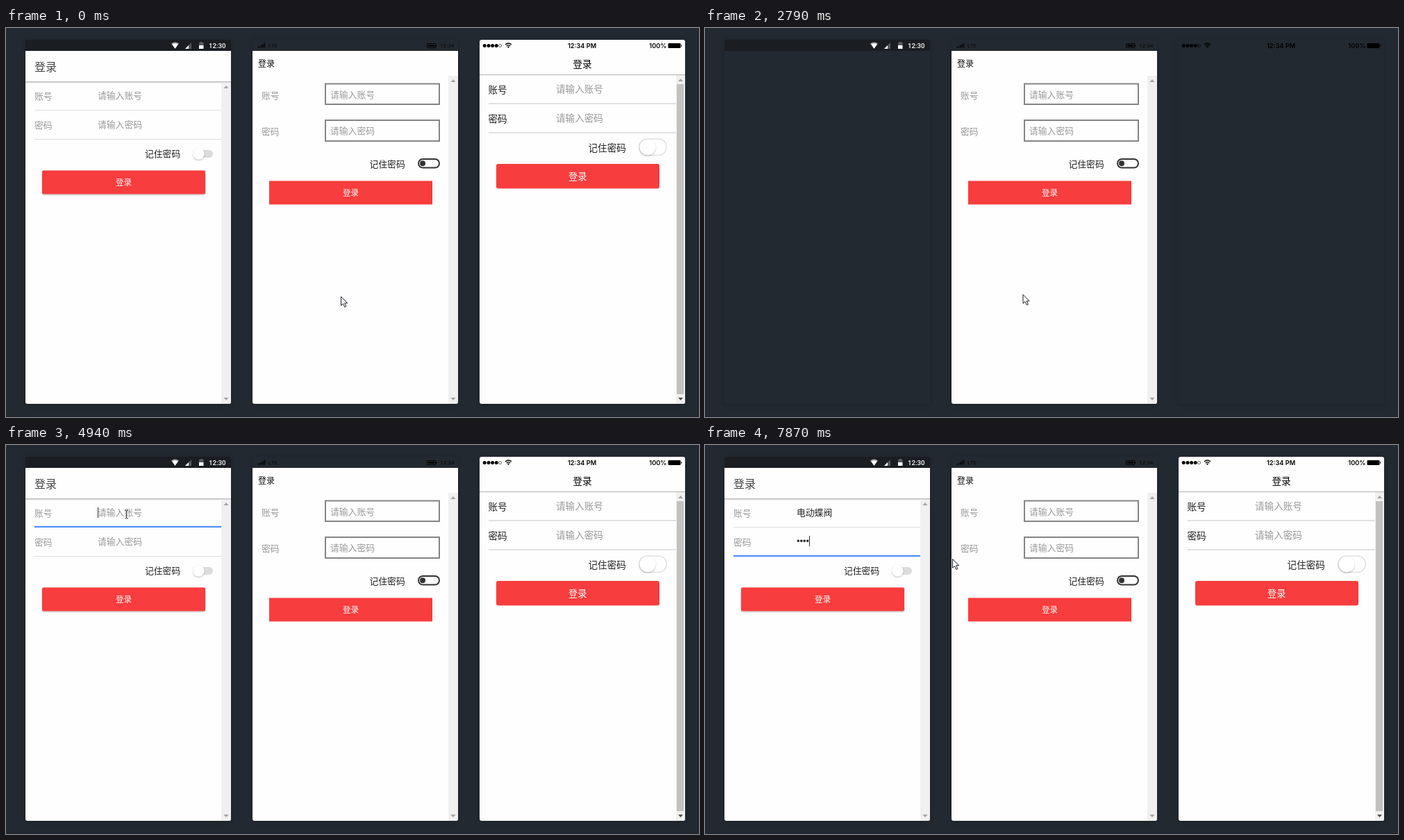
Animation of 998x561 px, one loop 8000 ms. Source, as an HTML page:

```html
<!DOCTYPE html>
<html lang="zh-CN">
<head>
<meta charset="utf-8">
<title>登录</title>
<style>
html, body { margin: 0; width: 100%; height: 100%; overflow: hidden; background: #232930; }
svg { position: absolute; left: 0; top: 0; }
.phone { position: absolute; top: 17px; width: 296px; height: 525px; border-radius: 3px; box-shadow: 0 1px 6px rgba(0,0,0,.16); }
text { font: 12.8px "Noto Sans CJK SC", "Noto Sans CJK JP", sans-serif; white-space: pre; }
.ios { font-size: 13.6px; }
.hint { fill: #999; }
.dark { fill: #222; }
.btn { fill: #fff; text-anchor: middle; font-size: 11.6px; font-weight: 500; }
.red { fill: #f73d3d; }
.page { fill: #fefefe; }
.focus { fill: #488aff; }
.caret { fill: #333; }
.bar { fill: #f0f0f1; }
.clock { font: 500 9.6px Roboto, sans-serif; fill: #fff; }
.wp { font: 8px "Open Sans", sans-serif; }
.sf { font: 600 9.2px Inter, sans-serif; }
.pinyin { font: bold 11.4px "Liberation Sans", Arial, sans-serif; fill: #4b8a12; }
.bullet { font: 12.8px "Liberation Sans", Arial, sans-serif; fill: #222; }
</style>
</head>
<body>
<div class="phone" style="left:28px"></div>
<div class="phone" style="left:355px"></div>
<div class="phone" style="left:682px"></div>
<svg width="998" height="561" viewBox="0 0 998 561">
  <defs>
    <filter id="soft" x="-30%" y="-30%" width="160%" height="170%">
      <feDropShadow dx="0" dy="1" stdDeviation="1" flood-opacity=".32"/>
    </filter>
    <linearGradient id="ime" x2="0" y2="1">
      <stop stop-color="#f8fcec"/><stop offset="1" stop-color="#f0f8da"/>
    </linearGradient>
    <radialGradient id="leaf">
      <stop stop-color="#a4c48a"/><stop offset="1" stop-color="#c9dfb9"/>
    </radialGradient>
    <clipPath id="imeClip"><path d="M470 120H600V213H470Z"/></clipPath>
  </defs>
  <path d="M0 560H998V561H0Z" fill="#1b1f2d"/>

  <!-- left phone -->
  <g id="left">
    <path class="page" d="M28 33H324V539Q324 542 321 542H31Q28 542 28 539Z"/>
    <g id="leftBar"></g>
    <path d="M28 77H324V78H28Z" fill="#b9b9b9"/>
    <path d="M28 78H324V79H28Z" fill="#dedede"/>
    <path d="M28 79H324V80H28Z" fill="#f2f2f2"/>
    <text x="41" y="62" font-weight="300" style="font-size:16px" fill="#424242">登录</text>
    <text class="hint" x="41" y="103">账号</text>
    <text class="hint" x="41" y="144.5">密码</text>
    <text id="account" x="132" y="102.3"></text>
    <text id="hint2" class="hint" x="132" y="144">请输入密码</text>
    <text id="dots" class="bullet" x="132" y="143"></text>
    <path d="M41 118H310V119H41ZM41 160H310V161H41Z" fill="#dedede"/>
    <g id="focus1" class="focus"><path d="M41 117H310V119H41Z"/></g>
    <g id="focus2" class="focus"><path d="M41 159H310V161H41Z"/></g>
    <rect id="caret" class="caret" width="1" height="15"/>
    <text class="dark" x="200" y="186">记住密码</text>
    <rect x="271" y="176" width="27" height="11" rx="5.5" fill="#dcdcdc"/>
    <circle cx="277.5" cy="181.5" r="8" fill="#fff" filter="url(#soft)"/>
    <rect class="red" x="52" y="205.5" width="235" height="34" rx="2" filter="url(#soft)"/>
    <text class="btn" x="169.5" y="226.5">登录</text>
  </g>
  <g id="status1">
    <path d="M28 33V20Q28 17 31 17H321Q324 17 324 20V33Z" fill="#1a1d22"/>
    <path d="M238 22.5Q243.5 18.5 249 22.5L243.5 30Z" fill="#aaa"/>
    <path d="M239.5 23.8Q243.5 21 247.5 23.8L243.5 29.5Z" fill="#fff"/>
    <path d="M267 21V30H258Z" fill="#555a60"/>
    <path d="M263 25V30H258Z" fill="#fff"/>
    <path d="M279.5 20H283V21H284.5V25H278V21H279.5Z" fill="#555a60"/>
    <path d="M278 25H284.5V30H278Z" fill="#fff"/>
    <text class="clock" x="292" y="28.7">12:30</text>
  </g>

  <!-- middle phone -->
  <g id="middle">
    <path class="page" d="M355 33H651V539Q651 542 648 542H358Q355 542 355 539Z"/>
    <g id="middleBar"></g>
    <text x="363" y="56" style="font-size:12px" font-weight="700" fill="#111">登录</text>
    <text class="hint" x="368" y="101.5">账号</text>
    <text class="hint" x="368" y="154">密码</text>
    <g fill="none" stroke="#858585" stroke-width="2">
      <path d="M460 80.5H624V110H460ZM460 133H624V163H460Z"/>
    </g>
    <text class="hint" x="467" y="101">请输入账号</text>
    <text class="hint" x="467" y="153.3">请输入密码</text>
    <text class="dark" x="523.5" y="201.3">记住密码</text>
    <rect x="594" y="189" width="30" height="12.5" rx="6.2" fill="#fff" stroke="#333" stroke-width="2"/>
    <circle cx="600" cy="195.2" r="4" fill="#333"/>
    <path class="red" d="M379 220.5H614V254.5H379Z"/>
    <text class="btn" x="496.5" y="241.5">登录</text>
  </g>
  <g id="status2" fill="#050607">
    <path d="M362 27h1.5v1.5h-1.5zM364.5 26h1.5v2.5h-1.5zM367 24.8h1.5v3.7h-1.5zM369.3 23.3h1.5v5.2h-1.5zM371.7 21.5h1.5v7h-1.5z"/>
    <text class="wp" x="378" y="28.4">LTE</text>
    <path d="M606.5 22.5H618.5V28.5H606.5ZM619.5 24V27" fill="none" stroke="#050607"/>
    <path d="M608 24H617V27H608Z"/>
    <text class="wp" x="625" y="28.4">12:34</text>
  </g>

  <!-- right phone -->
  <rect id="right" class="page" x="682" y="17" width="296" height="525" rx="3"/>
  <g id="status3">
    <path d="M689.2 25.5h.01M695 25.5h.01M700.6 25.5h.01M706.2 25.5h.01" stroke="#000" stroke-width="5" stroke-linecap="round"/>
    <circle cx="711.5" cy="25.5" r="2" fill="none" stroke="#000" stroke-width=".6"/>
    <g fill="none" stroke="#000" stroke-width="1.3">
      <path d="M719 24Q723.5 20 728 24M720.7 26Q723.5 23.6 726.3 26"/>
    </g>
    <path d="M722 27.2Q723.5 26 725 27.2L723.5 29Z"/>
    <text class="sf" x="829.5" y="28.7" text-anchor="middle">12:34 PM</text>
    <text class="sf" x="951.5" y="28.9" text-anchor="end">100%</text>
    <rect x="953.5" y="22" width="18" height="7" rx="1"/>
    <path d="M972.2 24V27Q973.4 26.5 973.4 25.5T972.2 24Z"/>
  </g>
  <g id="rightBody">
    <path d="M682 67H978V68H682Z" fill="#b2b2b2"/>
    <g id="rightBar"></g>
    <path d="M966 81H976V528H966Z" fill="#c1c1c1"/>
    <text class="ios" x="830" y="56.6" text-anchor="middle" font-weight="700">登录</text>
    <text class="ios dark" x="694.5" y="94">账号</text>
    <text class="ios dark" x="694.5" y="136">密码</text>
    <text class="ios hint" x="792" y="93.4">请输入账号</text>
    <text class="ios hint" x="792" y="135.2">请输入密码</text>
    <path d="M695 108.5H965V109.5H695ZM695 150.5H965V151.5H695Z" fill="#c8c8c8"/>
    <text class="ios dark" x="838.5" y="177.6">记住密码</text>
    <rect x="911.8" y="160" width="39.4" height="23.5" rx="11.7" fill="#fff" stroke="#e2e2e2" stroke-width="1.6"/>
    <circle cx="924" cy="172" r="11.3" fill="#fff" filter="url(#soft)"/>
    <rect class="red" x="706" y="196" width="235" height="35.5" rx="3"/>
    <text class="btn" x="823.3" y="218.7" style="font-size:13.2px;font-weight:400">登录</text>
  </g>

  <!-- input method window -->
  <g id="popup">
    <rect id="frame" x="143.5" y="160.5" height="52" rx="7" fill="url(#ime)" stroke="#86b05c"/>
    <text id="pinyin" class="pinyin" x="152" y="181"></text>
    <rect id="pinCaret" y="171" width="1" height="13" fill="#555"/>
    <text id="words" y="201.7"></text>
    <g id="tail">
      <path d="M484.5 192V202L479.5 197Z" fill="#b9d596"/>
      <path d="M489 192V202L494.5 197Z" fill="#4b8a12"/>
      <rect x="499.5" y="191.5" width="11" height="11" fill="#fbfdf2" stroke="#a5c57f"/>
      <path d="M502 195.5H508L505 199Z" fill="#5d942c"/>
      <g clip-path="url(#imeClip)">
        <g fill="url(#leaf)" fill-opacity=".93">
          <path d="M479 177C481 165 500 153 528 150C538 149 546 152 547 157C543 168 528 178 506 185C494 188 480 185 479 177Z"/>
          <path d="M531 136C540 126 562 129 571 137C590 138 597 152 593 166C583 172 572 168 562 172C552 176 538 171 540 160C542 150 533 146 531 136Z"/>
        </g>
        <path d="M531 136Q550 128 568 137Q564 146 562 150Q548 137 531 136Z" fill="#84ad65" fill-opacity=".7"/>
        <path id="veins" fill="none" stroke="#5f9146" stroke-width=".7" stroke-opacity=".6"/>
        <g fill="none" stroke="#41600f" stroke-width="1.7">
          <path d="M562 150C549 166 537 190 533 214M513 168C526 180 536 195 538 214M549 190Q543 202 546 214"/>
        </g>
        <path d="M519 205C523 191 536 180 550 183C545 193 533 200 519 205Z" fill="#e5a567"/>
        <path d="M546 184C558 177 575 184 574 194C563 203 549 200 546 184Z" fill="#f4d3b1"/>
        <path d="M541 186C553 187 570 198 566 211C552 211 542 201 541 186Z" fill="#f0c296" fill-opacity=".9"/>
        <path d="M537 186C538 174 543 164 552 163C560 170 561 182 553 191C546 193 540 191 537 186Z" fill="#d98a45"/>
        <path d="M549 166C543 173 542 181 543 190M552 166C554 175 553 183 549 190" fill="none" stroke="#b45f20"/>
      </g>
    </g>
  </g>

  <g id="cursor">
    <path id="arrow" d="M0 0V12.8L3 10L5.3 15L7.4 14.1L5.2 9.3H9.2Z" fill="#fff" stroke="#1d1f26"/>
    <path id="beam" d="M-2.5 -6Q0 -6 0 -4.5Q0 -6 2.5 -6M0 -5V5M-2.5 6Q0 6 0 4.5Q0 6 2.5 6" fill="none" stroke="#333"/>
  </g>
</svg>
<script>
const LOOP = 8000;
const $ = id => document.getElementById(id);
const show = (id, on) => $(id).setAttribute('visibility', on ? 'inherit' : 'hidden');
const attr = (id, map) => { for (const k in map) $(id).setAttribute(k, map[k]); };

// time, x, y, I-beam flag
const moves = [
  [0, 482.5, 387.5], [150, 457.5, 383.5], [1800, 456.5, 383.5], [2210, 457.5, 383.5],
  [2360, 453.5, 383.5], [2480, 458, 384.5], [4390, 391.5, 317.5], [4510, 282.5, 207.5],
  [4630, 199.5, 123.5], [4780, 175.5, 106, 1], [4940, 173.5, 100, 1], [5490, 167.5, 145.5],
  [6410, 168.5, 146.5], [6800, 168.5, 145.5], [6950, 199.5, 147.5], [7745, 278.5, 156.5],
  [7870, 356.5, 164.5]
];

// time, typed letters, candidates
const typing = [
  [0, '', ''],
  [5610, 'd', '的 到 都 大 对'],
  [5730, "d'd", '等等 得到 达到 弟弟 地点'],
  [5880, "d'd'd", '得到的 等等的 单独的 端到端 达到的'],
  [6030, "d'd'd'f", '电动蝶阀 到的地方 单独的 得到的 端到端'],
  [6150, '', '']
];

// time, focused row, caret shown at that row, dots typed
const focus = [
  [0, 0, 0], [4940, 1, 0], [6410, 2, 0], [6680, 0, 0], [7350, 2, 0],
  [7470, 2, 1], [7620, 2, 3], [7745, 2, 4]
];

const at = (table, t) => table.findLast(row => row[0] <= t);

function scrollbar(id, x, w, top, lower) {
  const c = x + w / 2;
  $(id).innerHTML = `<path class="bar" d="M${x} ${top}H${x + w}V539q0 3 -3 3H${x}Z"/>
    <path d="M${c - 3.5} ${top + 9}h7l-3.5 -4Z" fill="#a3a3a3"/>
    <path d="M${c - 3.5} 533h7l-3.5 4Z" fill="${lower}"/>`;
}

function drawVeins() {
  let d = '';
  for (const [x, y, rx, ry, tilt] of [[513, 168, 29, 13, -.38], [562, 150, 27, 19, .3]])
    for (let i = 0; i < 14; i++) {
      const a = i * Math.PI / 7, u = rx * Math.cos(a), v = ry * Math.sin(a);
      d += `M${x} ${y}l${u * Math.cos(tilt) - v * Math.sin(tilt)} ${u * Math.sin(tilt) + v * Math.cos(tilt)}`;
    }
  attr('veins', { d });
}

let shown = null;
function drawPopup([, letters, list]) {
  show('popup', letters);
  if (letters === shown) return;
  shown = letters;
  if (!letters) return;
  $('pinyin').textContent = letters;
  attr('pinCaret', { x: Math.round(152 + $('pinyin').getComputedTextLength()) + 1 });
  let x = 152;
  $('words').innerHTML = list.split(' ').map((word, i) => {
    const span = `<tspan x="${x}" fill="${i ? '#3f7d16' : '#86c232'}">${i + 1}.<tspan dx="1.2">${word}</tspan></tspan>`;
    x += 22.5 + 12.6 * word.length;
    return span;
  }).join('');
  const right = Math.round(x - 10.5 + 88);
  attr('frame', { width: right - 143.5 });
  attr('tail', { transform: `translate(${right - 556})` });
}

function drawForm(t) {
  const [, row, dots] = at(focus, t);
  const filled = t >= 6150;
  $('account').textContent = filled ? '电动蝶阀' : '请输入账号';
  attr('account', { fill: filled ? '#222' : '#999' });
  $('dots').textContent = '•'.repeat(dots);
  const open = t < 1800 || t >= 3930;
  show('hint2', open && !dots);
  show('focus1', open && row === 1);
  show('focus2', open && row === 2);
  show('caret', open && row);
  const x = row === 1 ? (filled ? 183 : 132) : 132 + Math.round(dots * 4.48);
  attr('caret', { x, y: row === 1 ? 90 : 131 });
}

function render(t) {
  const loaded = time => t < 1800 || t >= time;
  show('left', loaded(3930));
  show('middle', loaded(2790));
  show('right', loaded(3350));
  show('rightBody', loaded(3490));
  const lift = t >= 1800 && t < 2210 ? -1 : 0;
  for (const n of [1, 2, 3]) attr('status' + n, { transform: `translate(0 ${lift})` });
  drawForm(t);
  drawPopup(at(typing, t));
  const [, x, y, beam] = at(moves, t);
  attr('cursor', { transform: `translate(${x} ${y})` });
  show('arrow', !beam);
  show('beam', beam);
}

scrollbar('leftBar', 310, 14, 78, '#a3a3a3');
scrollbar('middleBar', 637, 14, 69, '#a3a3a3');
scrollbar('rightBar', 965, 13, 68, '#505050');
drawVeins();

const start = performance.now();
function tick() {
  render((performance.now() - start) % LOOP);
  requestAnimationFrame(tick);
}
tick();
</script>
</body>
</html>
```
